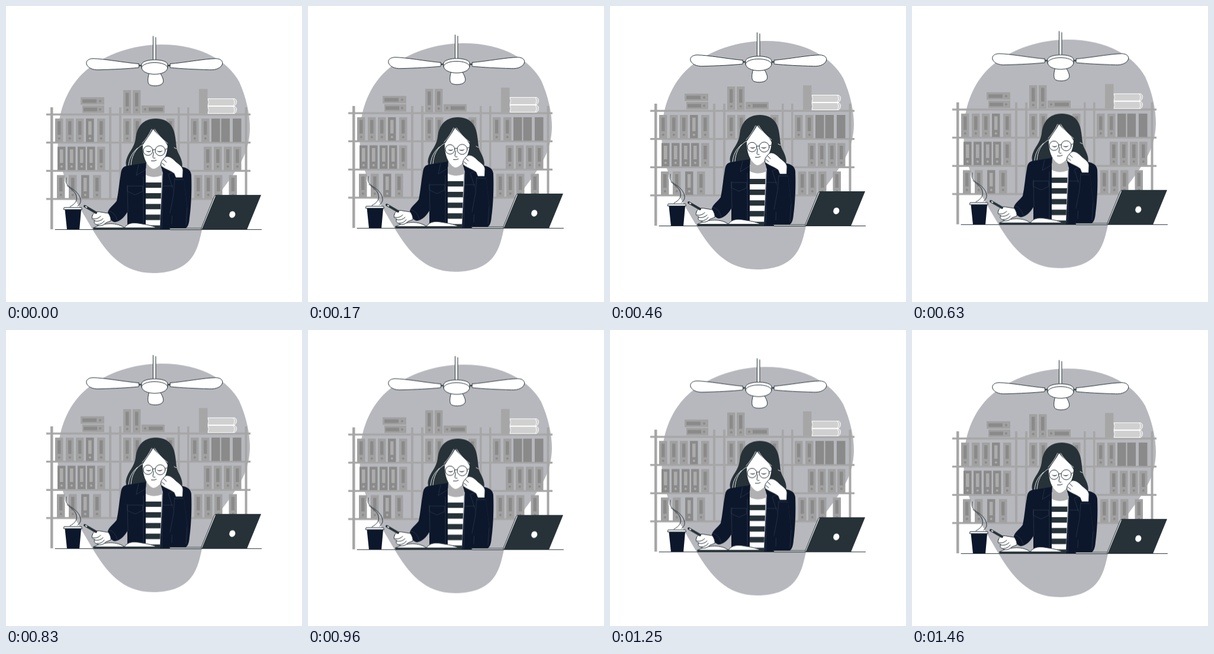
An HTML page that plays this animation: 500 px wide and 500 px high, repeating every 1.5 s.

```html
<!DOCTYPE html>
<html lang="en">
<head>
<meta charset="utf-8">
<title>Working at the desk</title>
<style>
  html, body { margin: 0; width: 100%; height: 100%; overflow: hidden; background: #fff; }
  svg { display: block; width: 100%; height: 100%; }
  #scene { animation: float 750ms linear -20ms infinite alternate; }
  @keyframes float {
    from { transform: translateY(.4px); }
    to { transform: translateY(-9.6px); }
  }
  .shelf { fill: #a6a6a6; }
  .dark { fill: #263238; }
  .navy { fill: #0c172b; }
  .white { fill: #fff; }
  .ink { stroke: #263238; stroke-width: 1; stroke-linejoin: round; stroke-linecap: round; }
  .line { fill: none; }
  .seam { fill: none; stroke: #37435a; stroke-width: .6; stroke-linejoin: round; }
  .strand { fill: none; stroke: #fff; stroke-width: .9; stroke-linecap: round; }
</style>
</head>
<body>
<svg viewBox="0 0 500 500">
  <defs>
    <path id="blade" d="M224 97.500C200 95.500 166 89 147 88.700C138 89 135 93.500 136 98C138 104 146 108.500 158 107.700C182 107 205 106 224 104Q226 101 224 97.500Z"/>
    <clipPath id="shirt"><path d="M236 285Q249 292 263 286L260 378H236Z"/></clipPath>
  </defs>
  <g id="scene">
    <path fill="#b7b8bd" d="M262 65C333 65 376 95 394 128C406 155 412 183 412 207C411 245 396 268 375 297C352 327 338 350 331 378C324 408 318 451 248 451C197 451 170 417 146 377C128 346 102 305 93 270C87 245 86 225 89 200C94 160 112 128 136 108C170 80 215 65.500 262 65Z"/>

    <g id="shelves" class="shelf">
      <path d="M75 171h4.500v206h-4.500zM403.500 171h4v150h-4zM174 171h4v156h-4zM191 171h4v156h-4zM290 171h3.500v156h-3.500zM306 171h3.500v156h-3.500z"/>
      <path d="M68 181.500h345v3.200h-345zM68 229h345v3.200h-345zM68 276.800h345v3.200h-345zM68 324.300h345v3.200h-345z"/>
      <path d="M326 140h14.500v41.500h-14.500z"/>
    </g>
    <g fill="#d0d0d0" stroke="#fff" stroke-width="1">
      <path d="M341 156.500H386Q390 158 389.500 162.500Q389 167 386 168.500H341Q344 162.500 341 156.500Z"/>
      <path d="M341 169.500H386Q390 171 389.500 175.500Q389 180 386 181.500H341Q344 175.500 341 169.500Z"/>
      <path class="line" d="M384 157Q388 162.500 384 168M384 170Q388 175.500 384 181"/>
    </g>

    <!-- ceiling fan -->
    <g class="white ink">
      <path d="M248.500 51V92H253V53"/>
      <use href="#blade"/>
      <use href="#blade" transform="matrix(-1 0 0 1 501.500 0)"/>
      <path stroke-width="2" d="M225 100.500H230M272 100.500H277"/>
      <path d="M241.500 114C239.500 121 239 128 241 131.500C244 136 260 136 264 131C268 127 264.500 120 261 114Z"/>
      <path d="M229 99C229 88 273 88 273 99V104C272 119 230 119 229 104Z"/>
      <path class="line" d="M229 104C231 92.500 271 92.500 273 104"/>
    </g>

    <!-- coffee -->
    <path class="strand" d="M102 290C97 296 99 302 105 306"/>
    <path class="line ink" stroke-width=".8" d="M102 290C99 299 104 303 111 308C121 314 127 323 126 331Q125 335 121 338M103 303C109 309 117 313 119 321C121 329 116 335 108 339"/>
    <path class="navy" d="M99.500 344H127L124 377.500H103Z"/>
    <path class="white ink" d="M98.500 340.300H127.500L128.500 343.700H97.700Z"/>

    <!-- woman -->
    <path class="dark" d="M253 190C231 190 221 205 219 223C217 241 205 247 202.500 264C202 271 206 276 213 274H297C299 268 297 260 293 252C287 242 288 235 286 222C284 204 275 190 253 190Z"/>
    <path class="strand" d="M231 234C218 241 212 254 211 269M222 240C212 249 208 258 207 270M284 239L288 241"/>
    <path fill="#b0b0b2" d="M237 265H262L263 287Q249 292 236 285Z"/>
    <path class="white" d="M248.500 208C243 218 236 226 231 235C230.500 252 236 268 247 274.500Q251 276 256 272C264 266 272 254 273 236C268 225 257 219 248.500 208Z"/>
    <path class="strand" d="M246 208Q240 221 230 232M251 208Q258 220 273 232"/>
    <g class="line ink" stroke-width=".9">
      <circle cx="240" cy="244.300" r="8"/>
      <circle cx="260.500" cy="244.300" r="8.500"/>
      <path d="M248 243Q250 241 252 243M269 242L273 241M249.500 247L248 255.500Q249 257.500 252 257M245.500 261.500Q250 262.500 254 260.500"/>
    </g>
    <path class="dark" d="M235.500 244Q240 246.500 246 244Q241 249.500 235.500 244ZM254 244Q259 246.500 265 244Q260 249.500 254 244Z"/>

    <g clip-path="url(#shirt)">
      <path class="white" d="M230 280h36v98h-36z"/>
      <path stroke="#263238" stroke-width="36" stroke-dasharray="9.100 9" d="M248 298V378"/>
    </g>

    <path class="navy" d="M236 265L219 267.500L203 270C196 272 195 277 194 283C191 299 190 315 187 329C182 336 174 341 172 348C172 358 178 364 184 365C193 364 200 356 205 348V377.500H236V286Z"/>
    <path class="navy" d="M261 267L265 282L260 377.500H298C306 376 309 371 310 358C313 335 314 308 313 285C312 277 307 274 299 272L284 269Z"/>
    <path class="seam" d="M224 268L220 286L235 277M205 304H231V313L218 319L205 313ZM206 348L205 302M232 288V376M265 283L263 376M275 284L285 280M264 304H282M274 284L282 309L280 368M300 292L306 340L304 370M173 346Q184 348 188 362"/>
    <path class="white ink" stroke-width=".8" d="M262 264C264 260 267 256 271 254C277 253.500 282 258 287 263C293 268 298 271 299 277L298.500 290.500H287L284 283C278 278 267 275 262 270Z"/>
    <path class="line ink" stroke-width=".6" d="M266 259L271 264M263 265L268 269"/>
    <path class="navy" d="M283 289.500H300L306 340L291 354L278 354Z"/>
    <path class="seam" d="M285 293H300M285 291L283 318L277 350"/>

    <!-- writing hand and notebook -->
    <path class="dark" d="M147 374.300H255V377.800H150Q147 377 147 374.300Z"/>
    <path class="white ink" stroke-width=".9" d="M148 374.500C160 368 185 363 200 374.500C207 364 219 366 230 368Q245 370 255 374.500Z"/>
    <path class="white ink" stroke-width=".9" d="M146 354C147 349 153 346 160 348L173 350Q178 358 177 363L169 366C164 371 158 373 153 369C149 368 148 365 150 362C146 361 144 358 146 354Z"/>
    <path class="line ink" stroke-width=".8" d="M147 359Q154 361 160 355M150 363Q158 365 164 359M154 369Q162 369 166 363"/>
    <path stroke="#263238" stroke-width="4" stroke-linecap="round" d="M133 338L152 349"/>
    <path stroke="#fff" stroke-width="1.600" d="M134 338.500L137 340.300"/>

    <!-- laptop and desk -->
    <path class="white ink" stroke-width=".8" d="M355 319.500L331 377.500H329L352 321Z"/>
    <path class="dark" d="M355 319H431L407 377.500H331Z"/>
    <ellipse class="white" cx="382.300" cy="352" rx="5" ry="5.700" transform="rotate(20 382 352)"/>
    <path class="white ink" stroke-width=".8" d="M276 375.300H330V377.700H278Z"/>
    <path class="ink" d="M83 377.500H431.500"/>
  </g>
</svg>
<script>
const NS = 'http://www.w3.org/2000/svg';
const BODY = '#a1a1a1', DEEP = '#8a8a8a';
const shelves = document.getElementById('shelves');

function add(tag, attrs) {
  const el = document.createElementNS(NS, tag);
  for (const k in attrs) el.setAttribute(k, attrs[k]);
  shelves.append(el);
}
function rect(x, y, width, height, fill) {
  add('rect', { x, y, width, height, fill });
}
function upright(x, y, dark) {
  const label = dark ? '#acacac' : DEEP;
  rect(x, y, 13.5, 39.5, dark ? DEEP : BODY);
  rect(x + 4, y + 4.5, 5.5, 23, label);
  add('circle', { cx: x + 6.8, cy: y + 33.5, r: 2, fill: label });
}
function lying(x, y, w, labelX, labelW, dotX) {
  rect(x, y, w, 12.5, BODY);
  rect(labelX, y + 3.5, labelW, 6, DEEP);
  add('circle', { cx: dotX, cy: y + 6.4, r: 2, fill: DEEP });
}

const rows = [
  { y: 142, xs: [198, 214] },
  { y: 190, xs: [83, 101, 118, 135, 154, 198, 215, 271, 312, 330], dark: [135] },
  { y: 237.5, xs: [87, 104, 121, 137, 154, 334, 351, 368, 384], dark: [87, 104, 121, 137] },
  { y: 285.5, xs: [86, 106, 127, 147, 318, 335, 352, 376.5], dark: [127] }
];
for (const { y, xs, dark = [] } of rows)
  for (const x of xs) upright(x, y, dark.includes(x));

for (const x of [347, 363.5, 383]) rect(x, 190, 14.5, 39.5, DEEP);
lying(126, 154, 40, 129, 24, 159);
lying(129, 168, 37, 131, 23, 159);
lying(229, 168, 39, 241, 24, 235);
</script>
</body>
</html>
```
